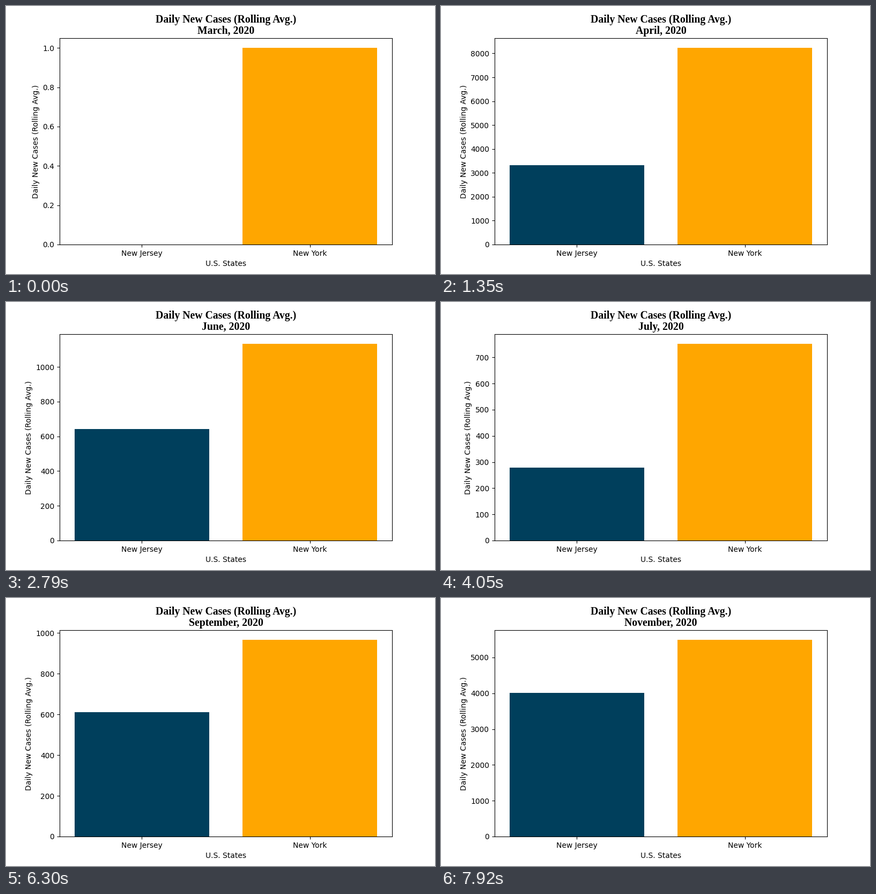
Animation of 800x500 px, one loop 8 s. Source, as a matplotlib script:

```python
import numpy as np
import matplotlib.pyplot as plt
from matplotlib.animation import FuncAnimation

FRAMES = 89
LOOP_MS = 8000
START = np.datetime64("2020-03-04")
DAYS_PER_FRAME = 3
MONTHS = ("January February March April May June July August "
          "September October November December").split()
STATES = ["New Jersey", "New York"]
COLORS = ["#003f5c", "#ffa600"]
METRIC = "Daily New Cases (Rolling Avg.)"

# Turning points of both curves: step, New Jersey, New York
TURNS = np.array([
    (0, 0, 1), (3, 7, 55), (6, 259, 2063), (9, 2146, 7161),
    (12, 3634, 9651), (15, 3322, 8228), (18, 3197, 7030),
    (20, 2529, 4053), (25, 1156, 2045), (31, 642, 1132),
    (35, 370, 712), (45, 278, 751), (49, 460, 670), (59, 300, 608),
    (65, 400, 725), (70, 611, 966), (73, 750, 1370), (76, 870, 1300),
    (81, 1650, 2020), (88, 4006, 5489),
])

plt.rcParams["font.family"] = "DejaVu Sans"
fig, ax = plt.subplots(figsize=(8, 5), dpi=100)


def heading(y, text):
    return fig.text(0.5125, 1 - y / 500, text, ha="center", va="baseline",
                    family="Liberation Serif", weight="bold", size=14.2)


heading(31, METRIC)
month_text = heading(51.7, "")


def cases(i):
    """Exponential growth or decay between neighbouring turning points."""
    steps, *curves = TURNS.T
    return [np.expm1(np.interp(i, steps, np.log1p(c))) for c in curves]


def month_label(i):
    month = (START + DAYS_PER_FRAME * i).astype("datetime64[M]").astype(int)
    return f"{MONTHS[month % 12]}, {1970 + month // 12}"


def draw(i):
    ax.clear()
    ax.bar(STATES, cases(i), color=COLORS)
    ax.set_xlabel("U.S. States")
    ax.set_ylabel(METRIC)
    month_text.set_text(month_label(i))
    return []


anim = FuncAnimation(fig, draw, frames=FRAMES, interval=LOOP_MS / FRAMES,
                     init_func=lambda: draw(0), repeat=True, repeat_delay=0)
plt.show()
```
